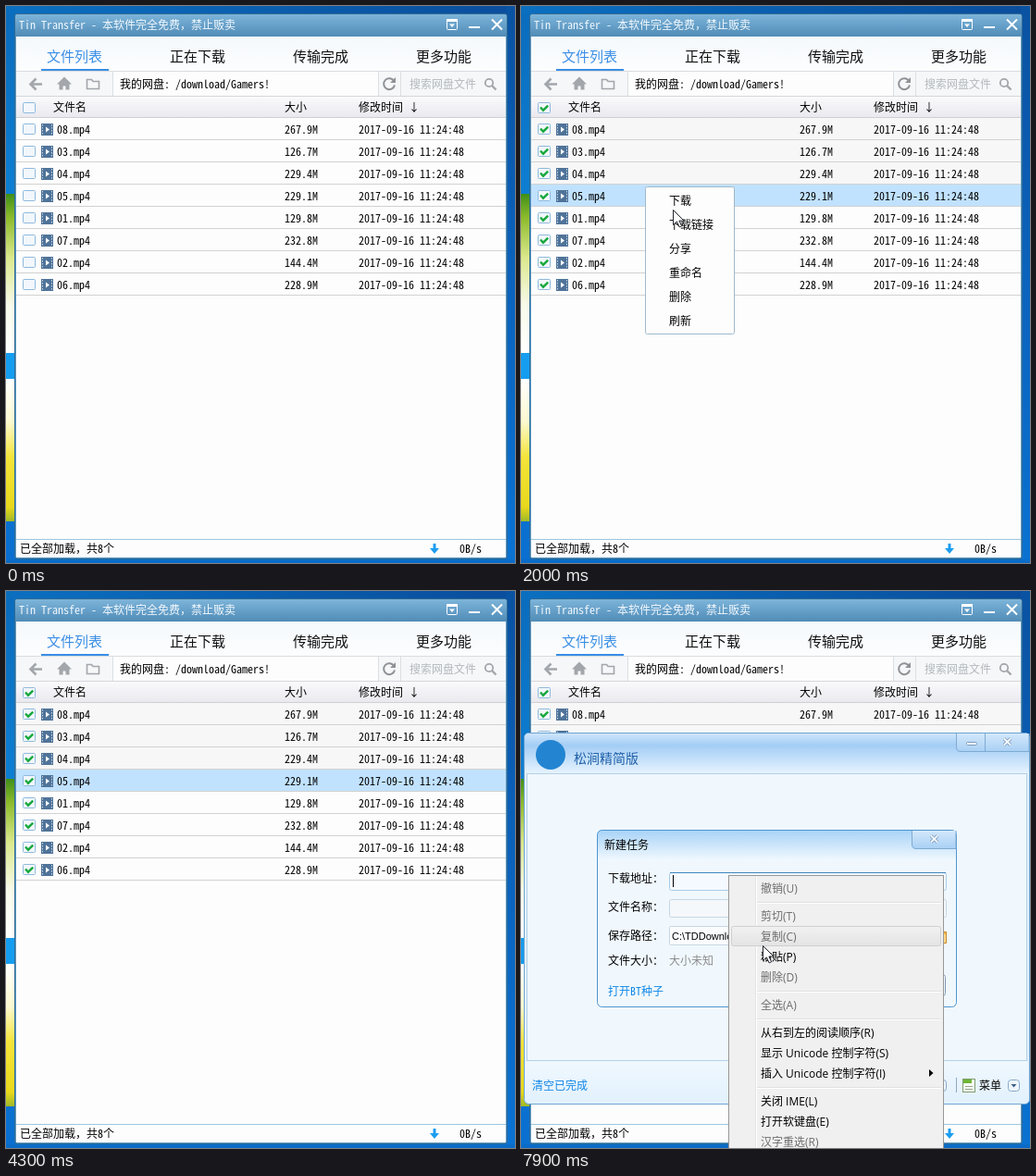
Recreate the animation shown at these times as an HTML page. Size 550 by 602 pixels, loop 8 s.

```html
<!DOCTYPE html>
<html lang="zh-CN">
<head>
<meta charset="utf-8">
<title>下载演示</title>
<style>
html, body { margin: 0; width: 550px; height: 602px; overflow: hidden; }
svg { display: block; }
text { font: 12px "Noto Sans Mono CJK SC", "Noto Sans CJK SC", "Noto Sans CJK", monospace; white-space: pre; }
.ui { font-family: "Open Sans", "Noto Sans CJK SC", "Noto Sans CJK", sans-serif; }
.brand { font-family: "Noto Sans CJK SC", "Noto Sans CJK", sans-serif; font-size: 14px; font-weight: 500; }
.tab { font-size: 15px; }
.field { font: 11px "Liberation Sans", sans-serif; }
</style>
</head>
<body>
<svg id="stage" width="550" height="602" viewBox="0 0 550 602"></svg>
<script>
const LOOP = 8000, STEP = 100;
const stage = document.getElementById('stage');

// Drawing helpers
const rect = (x, y, w, h, fill, more = '') =>
  `<rect x="${x}" y="${y}" width="${w}" height="${h}" fill="${fill}" ${more}/>`;
const box = (x, y, w, h, fill, line, r = 0, more = '') =>
  rect(x + .5, y + .5, w - 1, h - 1, fill, `stroke="${line}" rx="${r}" ${more}`);
const text = (x, mid, str, fill = '#000', more = '') =>
  `<text x="${x}" y="${mid + 4.5}" fill="${fill}" ${more}>${str.replace(/&/g, '&amp;')}</text>`;
const label = (x, mid, str, fill, more = '') => text(x, mid, str, fill, 'text-anchor="middle" ' + more);
const path = (d, fill, line = 'none', w = 1, more = '') =>
  `<path d="${d}" fill="${fill}" stroke="${line}" stroke-width="${w}" ${more}/>`;
const group = (id, body, hidden = true) =>
  `<g id="${id}" ${hidden ? 'visibility="hidden"' : ''}>${body}</g>`;
const grad = (id, ...stops) => `<linearGradient id="${id}" x2="0" y2="1">` +
  stops.map(([at, c]) => `<stop offset="${at}" stop-color="${c}"/>`).join('') + '</linearGradient>';
const cross = (x, y, s, line, w = 2) =>
  path(`M${x - s} ${y - s}L${x + s} ${y + s}M${x + s} ${y - s}L${x - s} ${y + s}`, 'none', line, w);

const defs = '<defs>' +
  '<linearGradient id="sky"><stop stop-color="#0b6fc0"/><stop offset="1" stop-color="#0a4d9c"/></linearGradient>' +
  grad('side', [0, '#0a52a2'], [.5, '#0b63bd'], [1, '#0a72d2']) +
  grad('left', [0, '#0b6cbd'], [.35, '#0d80d4'], [1, '#0a6fd0']) +
  grad('leaf', [0, '#3f8f18'], [.15, '#8dbb2c'], [.4, '#dbe88c'], [.7, '#f8faea'], [1, '#fff']) +
  grad('petal', [0, '#fff'], [.3, '#fbf9d0'], [.55, '#f5e43a'], [.9, '#e8d81c'], [1, '#9fb828']) +
  grad('bar', [0, '#7db4d9'], [.5, '#659fc8'], [1, '#4f8ab4']) +
  grad('tabs', [0, '#f4f9fc'], [1, '#fdfdfe']) +
  grad('head', [0, '#fafafc'], [1, '#e9e9ef']) +
  grad('btn', [0, '#fbfdfe'], [1, '#e3edf4']) +
  grad('glass', [0, '#cfe5fa'], [.3, '#a3cdf5'], [1, '#e6f3fe']) +
  grad('foot', [0, '#f0f8fe'], [1, '#e2f1fd']) +
  grad('task', [0, '#a8d3f7'], [.17, '#f0f8fe'], [1, '#f0f8fe']) +
  grad('cap', [0, '#d3e8fb'], [1, '#a9d0f4']) +
  grad('push', [0, '#fdfeff'], [1, '#d9e2ea']) +
  grad('main', [0, '#e6f2fd'], [1, '#bfdaf2']) +
  grad('pick', [0, '#f1f1f1'], [1, '#e4e4e4']) + '</defs>';

const desktop = rect(0, 0, 550, 602, 'url(#sky)') + rect(540, 0, 10, 602, 'url(#side)') +
  rect(0, 9, 11, 593, 'url(#left)') + rect(0, 203, 10, 172, 'url(#leaf)') +
  rect(0, 375, 10, 28, '#159df0') + rect(0, 403, 10, 154, 'url(#petal)') +
  rect(0, 598, 550, 4, '#0a6cc8');

// Blue framed window, shared by the main window and its popups
const frame = (x, y, w, h, body) =>
  box(x, y, w, h, '#5f9ac2', '#2f6a94', 3) + rect(x + 1, y + 1, w - 2, 25, 'url(#bar)', 'rx="2"') +
  rect(x + 2, y + 25, w - 4, h - 27, body);

const files = [['08', '267.9M'], ['03', '126.7M'], ['04', '229.4M'], ['05', '229.1M'],
  ['01', '129.8M'], ['07', '232.8M'], ['02', '144.4M'], ['06', '228.9M']];
const rowTop = i => 121 + 24 * i;
const check = y => box(18, y, 14, 12, '#f1f7fc', '#8fb9dc', 1);
const tick = y => path(`M21 ${y + 5.5}l3 3.2 5.2-5`, 'none', '#17a83c', 2.4);
const film = y => rect(38, y, 13, 13, '#4f7399') +
  path(`M39.5 ${y + 1}v12M49.5 ${y + 1}v12`, 'none', '#c9d8e6', 1, 'stroke-dasharray="1.5 1.5"') +
  path(`M43 ${y + 3.5}v6l4-3z`, '#fff');

const row = ([name, size], i) => {
  const y = rowTop(i);
  return rect(11, y, 529, 23, '#fdfdfd', `id="row${i}"`) + rect(11, y + 23, 529, 1, '#d2d2d2') +
    check(y + 6) + film(y + 6) + text(55, y + 12, name + '.mp4') + text(301, y + 12, size) +
    text(381, y + 12, '2017-09-16 11:24:48');
};

const tabs = ['文件列表', '正在下载', '传输完成', '更多功能'].map((s, i) =>
  label(74 + 133 * i, 55, s, i ? '#111' : '#3a8ee6', 'class="tab"')).join('');

const toolbar = rect(11, 70, 529, 28, '#f5f7f9') + rect(11, 70, 529, 1, '#d8dde1') +
  rect(11, 97, 529, 1, '#d4d6da') + rect(116, 71, 286, 26, '#fdfdfd') +
  [115, 402, 426].map(x => rect(x, 71, 1, 26, '#dcdfe2')).join('') +
  path('M39 84.5H27M32.5 78.5l-6 6 6 6', 'none', '#a3a6aa', 2.6) +
  path('M55 84.5l8-8 8 8h-2.5v6h-4v-4h-3v4h-4v-6z', '#a3a6aa') +
  path('M87.5 79.5v10h13v-8h-6.5l-1.5-2z', 'none', '#a3a6aa', 1.6) +
  text(123, 84, '我的网盘: /download/Gamers!') +
  path('M419.5 81.5a6 6 0 1 0 .5 4', 'none', '#8f9296', 2) + path('M421 77v6h-6z', '#8f9296') +
  text(436, 84, '搜索网盘文件', '#b4b8bc') +
  '<circle cx="522" cy="83" r="4.2" fill="none" stroke="#a3a6aa" stroke-width="1.8"/>' +
  path('M525 86l4.5 4.5', 'none', '#a3a6aa', 2.4);

const mainWindow = frame(9, 8, 533, 590, '#fdfdfd') +
  text(14, 20, 'Tin Transfer - 本软件完全免费，禁止贩卖', '#f2f8fc') +
  box(476, 14, 12, 12, 'none', '#fff', 1) + rect(476, 14, 12, 3, '#fff') + path('M479 19.5h6l-3 3.5z', '#fff') +
  rect(500, 22, 12, 2, '#fff') + cross(530.5, 20, 5.5, '#fff') +
  rect(11, 33, 529, 37, 'url(#tabs)') + tabs + toolbar + rect(38, 68, 73, 2, '#3a8ee6') +
  rect(11, 98, 529, 22, 'url(#head)') + rect(11, 120, 529, 1, '#cfcfd4') + check(104) +
  text(51, 109, '文件名') + text(301, 109, '大小') + text(381, 109, '修改时间 ↓') +
  files.map(row).join('') +
  rect(11, 576, 529, 1, '#9cc6e2') + text(15, 586, '已全部加载，共8个') +
  path('M461.5 581h3v5h3.5l-5 6-5-6h3.5z', '#1c9df0') + text(490, 586, '0B/s');

const ticks = tick(104) + files.map((_, i) => tick(rowTop(i) + 6)).join('');

const fileMenu = box(134, 195, 97, 160, '#fdfdfd', '#9fb9cc', 2) +
  rect(136, 223, 93, 26, '#d5ebfc', 'id="menuHot"') +
  ['下载', '下载链接', '分享', '重命名', '删除', '刷新'].map((s, i) => text(160, 210 + 26 * i, s)).join('');

const waitBox = frame(150, 238, 250, 130, '#f5f8fa') + text(157, 250, '请稍候', '#fff') +
  label(275, 315, '正在获取下载链接...', '#000');

const link = 'logid=5996899608108953445&dp-callid=0&vuk=1830422066';
const linkBox = frame(55, 259, 440, 89, '#f4f7f9') + text(62, 271, '下载链接', '#fff') +
  cross(482, 271, 5.5, '#fff') + box(69, 299, 320, 30, '#fff', '#bcd3e4', 1) +
  text(73, 314, link) +
  group('marked', rect(73, 307, 312, 14, '#3399ff') + text(73, 314, link, '#fff') + rect(385, 307, 1, 14, '#e08a2c'), false) +
  box(400, 299, 80, 30, 'url(#btn)', '#a9c6da', 2) + label(440, 314, '复制');

const smallClose = (x, y) => cross(x, y, 3.5, '#6f93b8', 3.4) + cross(x, y, 3.5, '#fff', 1.8);
const drop = x => box(x, 528, 13, 13, '#eef6fd', '#86a8ca', 3) + path(`M${x + 3.5} 533h6l-3 3.5z`, '#3f6186');
const taskApp = box(3, 153, 547, 402, '#e2f1fd', '#6ea4d2', 5) +
  rect(4, 154, 545, 43, 'url(#glass)', 'rx="4"') + rect(5, 508, 543, 45, 'url(#foot)', 'rx="3"') +
  box(6, 197, 541, 311, '#f0f8fe', '#b5d0e6') +
  path('M470.5 154v15q0 4.5 4.5 4.5h74V154M501.5 154v19', 'url(#cap)', '#7fabd2') +
  box(481, 163, 12, 4, '#fff', '#7a9bbd', 1) + smallClose(525.5, 163) +
  '<circle cx="32" cy="177" r="16" fill="#2385d2"/>' +
  text(57, 181, '松涧精简版', '#1d5fa8', 'class="brand"') +
  text(12, 534, '清空已完成', '#0f86e6') +
  path('M379 526.5h6v5h5v6h-5v5h-6v-5h-5v-6h5z', '#58b71c', '#3f8f12') +
  text(393, 534, '新建任务') + drop(447) + rect(470, 526, 1, 16, '#8fa9c2') +
  box(477, 527, 14, 15, '#f8fbf6', '#7f9c70') + rect(478, 528, 9, 4, '#6fb536') +
  path('M480 535.5h8M480 538.5h8', 'none', '#93a78a') + text(495, 534, '菜单') + drop(526);

const push = (x, s, fill, line) => box(x, 414, 73, 24, fill, line, 3) +
  box(x + 1, 415, 71, 22, 'none', '#fff', 2, 'opacity=".7"') + label(x + 36.5, 426, s);
const taskBox = box(82, 258, 389, 192, 'url(#task)', '#4f95cf', 5) +
  path('M422.5 259v15q0 4.5 4.5 4.5h43V259', 'url(#cap)', '#7fabd2') + smallClose(446.5, 268) +
  text(90, 274, '新建任务') +
  [['下载地址：', 310], ['文件名称：', 341], ['保存路径：', 372], ['文件大小：', 399]]
    .map(([s, y]) => text(94, y, s)).join('') +
  box(160, 304, 300, 20, '#f4faff', '#a9cbe6', 2) + rect(161, 304, 298, 1, '#3d86bd') + rect(164, 307, 1, 13, '#000') +
  box(160, 333, 300, 20, '#f5f8fb', '#c6d6e4', 2) + box(160, 362, 278, 21, '#fafcfd', '#c6d6e4', 1) +
  text(163, 372, 'C:\\TDDownload', '#000', 'class="field"') +
  path('M425.5 371h8l-4 4.5z', '#000') +
  path('M443.5 366.5h6l2 2h8v12h-16z', '#f0b74a', '#c98a2a') + rect(444, 371, 15, 9, '#fbd88a') +
  text(160, 399, '大小未知', '#8c8c8c') + text(94, 432, '打开BT种子', '#0f86e6') +
  push(299, '立即下载', 'url(#main)', '#6f9cc6') + push(386, '取消', 'url(#push)', '#7f99b2');

// Edit menu: [label, middle, enabled]
const items = [['撤销(U)', 321], ['剪切(T)', 351], ['复制(C)', 373], ['粘贴(P)', 395, 1], ['删除(D)', 417],
  ['全选(A)', 447], ['从右到左的阅读顺序(R)', 477, 1], ['显示 Unicode 控制字符(S)', 499, 1],
  ['插入 Unicode 控制字符(I)', 521, 1], ['关闭 IME(L)', 551, 1], ['打开软键盘(E)', 573, 1], ['汉字重选(R)', 595]];
const editMenu = box(224, 307, 233, 310, '#f0f0f0', '#979797') +
  rect(253, 309, 1, 300, '#e2e3e3') + rect(254, 309, 1, 300, '#fff') +
  [336, 432, 462, 536].map(y => rect(255, y, 199, 1, '#e0e0e0') + rect(255, y + 1, 199, 1, '#fff')).join('') +
  box(227, 0, 227, 22, 'url(#pick)', '#cfcfcf', 2, 'id="hot"') +
  items.map(([s, y, on]) => text(259, y, s, on ? '#000' : '#6d6d6d', 'class="ui"')).join('') +
  path('M441 517v8l4.5-4z', '#000');

const pointer = path('M.5.5v16l3.9-3.6 2.7 6 2.5-1.1-2.7-5.8h5.1z', '#fff', '#23262e');
const beam = path('M-3-8h2l1 1 1-1h2M0-7V7M-3 8h2l1-1 1 1h2', 'none', '#222');

stage.innerHTML = defs + desktop + mainWindow + group('ticks', ticks) + group('fileMenu', fileMenu) +
  group('waitBox', waitBox) + group('linkBox', linkBox) + group('taskApp', taskApp) +
  group('taskBox', taskBox) + group('editMenu', editMenu) + group('pointer', pointer) + group('beam', beam);
const $ = id => document.getElementById(id);

// When each part is on screen
const spans = {
  ticks: [900, LOOP], fileMenu: [1600, 2400], waitBox: [2400, 2600], linkBox: [2600, 4100],
  taskApp: [5200, LOOP], taskBox: [6500, LOOP], editMenu: [7600, LOOP]
};

// Pointer tracks: [time, x, y]
const tracks = [
  { end: 4300, keys: [[100, 150, 126], [700, 24, 109], [900, 24, 109], [1300, 134, 195], [1600, 134, 195],
    [2100, 172, 226], [2400, 172, 226], [2600, 180, 243], [3200, 425, 315], [3400, 425, 315],
    [3800, 484, 267], [4000, 484, 267], [4100, 430, 300], [4200, 357, 342]] },
  { end: LOOP, keys: [[5500, 14, 549], [5700, 125, 530], [6000, 306, 519], [6100, 350, 517], [6200, 427, 538],
    [6700, 427, 538], [7300, 213, 340], [7500, 225, 307], [7600, 225, 307], [7700, 235, 330],
    [7800, 248, 358], [7900, 261, 383]] }
];

function pointerAt(t) {
  const track = tracks.find(k => t >= k.keys[0][0] && t < k.end);
  if (!track) return null;
  const n = track.keys.findIndex(k => k[0] > t);
  if (n < 0) return track.keys.at(-1).slice(1);
  const [a, x, y] = track.keys[n - 1], [b, u, v] = track.keys[n], k = (t - a) / (b - a);
  return [x + (u - x) * k, y + (v - y) * k];
}

const show = (id, on) => $(id).setAttribute('visibility', on ? 'visible' : 'hidden');

function paintRows(t, pos) {
  const free = t < 1600 || (t >= 4100 && t < 4300);
  const hover = pos && free && pos[1] >= 121 ? Math.floor((pos[1] - 121) / 24) : -1;
  files.forEach((_, i) => {
    const passed = t >= 1000 && i < 3;
    const fill = i === 3 && t >= 1600 ? '#c1e2ff' : i === hover ? '#e8f5ff' : passed ? '#f7f7f7' : '#fdfdfd';
    $('row' + i).setAttribute('fill', fill);
  });
}

function draw(time) {
  const t = Math.floor(time / STEP) * STEP;
  const pos = pointerAt(t);
  for (const id in spans) show(id, t >= spans[id][0] && t < spans[id][1]);
  show('marked', t >= 2600 && t < 3400);
  show('menuHot', t >= 2100 && t < 2400);
  paintRows(t, pos);

  const typing = t >= 7300 && t < 7600;
  show('pointer', pos && !typing);
  show('beam', pos && typing);
  if (pos) for (const id of ['pointer', 'beam'])
    $(id).setAttribute('transform', `translate(${pos.map(Math.round)})`);

  const hot = t >= 7700 && pos && items.find(([, y]) => Math.abs(pos[1] - y) <= 11);
  show('hot', hot);
  if (hot) $('hot').setAttribute('y', hot[1] - 10.5);
}

const start = performance.now();
function tickFrame() {
  draw((performance.now() - start) % LOOP);
  requestAnimationFrame(tickFrame);
}
tickFrame();
</script>
</body>
</html>
```
